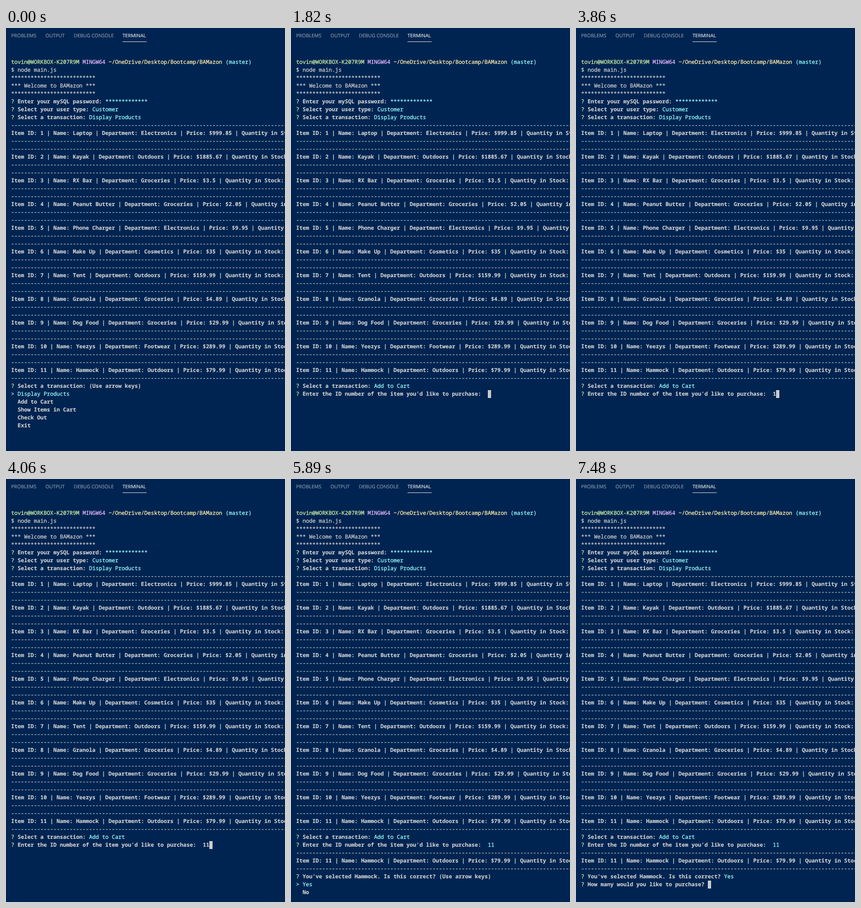
An HTML page for the animation above (8000 ms loop, 601 by 910 pixels).

```html
<!DOCTYPE html>
<html lang="en">
<head>
<meta charset="utf-8">
<title>Store terminal</title>
<style>
  html, body { margin: 0; width: 100%; height: 100%; overflow: hidden; background: #002451; }
  svg { display: block; width: 601px; height: 910px; }
  text { white-space: pre; text-rendering: geometricPrecision; stroke: currentColor; fill: currentColor; stroke-linejoin: round; }
  .term text { font: 500 11.6667px "Noto Sans Mono", "DejaVu Sans Mono", monospace; font-variant-ligatures: none; stroke-width: .3px; }
  .term .bold { font-weight: 600; stroke-width: .1px; }
  .tab { font: 10.5px "Open Sans", "Noto Sans", sans-serif; stroke-width: .2px; }
</style>
</head>
<body>
<svg id="stage" viewBox="0 0 601 910">
  <rect width="601" height="910" fill="#002451"/>
</svg>
<script>
const NS = "http://www.w3.org/2000/svg";
const LEFT = 11, TOP = 65, CELL = 7, ROW = 17, LOOP = 8000;
const COLORS = {
  white: "#cccccc", bold: "#d4d4d4", green: "#d1f1a9",
  magenta: "#ebbbff", yellow: "#ffeead", cyan: "#99ffff"
};
const stage = document.getElementById("stage");

function add(parent, tag, attrs, text) {
  const el = document.createElementNS(NS, tag);
  for (const key in attrs) el.setAttribute(key, attrs[key]);
  if (text) el.textContent = text;
  return parent.appendChild(el);
}

// A run is [style, text]; runs follow each other on the character grid.
function line(parent, row, ...runs) {
  let col = 0;
  for (const [style, text] of runs) {
    const x = LEFT + col * CELL, y = TOP + row * ROW;
    if (style === "cursor") {
      add(parent, "rect", { x, y, width: CELL, height: ROW, fill: COLORS.white });
    } else {
      add(parent, "text", { x, y: y + 12, color: COLORS[style], class: style }, text);
    }
    col += text.length;
  }
}

const CURSOR = ["cursor", " "];
const ask = (parent, row, message, ...rest) =>
  line(parent, row, ["green", "? "], ["bold", message + " "], ...rest);

function item(parent, row, id) {
  const [name, department, price] = products[id - 1];
  const rule = ["white", "-".repeat(86)];
  line(parent, row, rule);
  line(parent, row + 1, ["bold", `Item ID: ${id} | Name: ${name} | Department: ${department} | Price: $${price} | Quantity in Stock:`]);
  line(parent, row + 2, rule);
}

function menu(parent, row, options, selected) {
  options.forEach((option, i) => {
    const on = i === selected;
    line(parent, row + i, [on ? "cyan" : "bold", (on ? "> " : "  ") + option]);
  });
}

const products = [
  ["Laptop", "Electronics", "999.85"],
  ["Kayak", "Outdoors", "1885.67"],
  ["RX Bar", "Groceries", "3.5"],
  ["Peanut Butter", "Groceries", "2.05"],
  ["Phone Charger", "Electronics", "9.95"],
  ["Make Up", "Cosmetics", "35"],
  ["Tent", "Outdoors", "159.99"],
  ["Granola", "Groceries", "4.89"],
  ["Dog Food", "Groceries", "29.99"],
  ["Yeezys", "Footwear", "289.99"],
  ["Hammock", "Outdoors", "79.99"]
];
const actions = ["Display Products", "Add to Cart", "Show Items in Cart", "Check Out", "Exit"];

// Panel tabs
[["PROBLEMS", 11], ["OUTPUT", 85], ["DEBUG CONSOLE", 146], ["TERMINAL", 251]].forEach(([label, x], i) =>
  add(stage, "text", { x, y: 20, class: "tab", color: i === 3 ? "#e7e7e7" : "#8b99ab" }, label));
add(stage, "rect", { x: 251, y: 29, width: 52, height: 1, fill: "#e7e7e7" });

// Fixed terminal output
const term = add(stage, "g", { class: "term" });
line(term, 0, ["green", "tovin@WORKBOX-K207R9M "], ["magenta", "MINGW64 "],
  ["yellow", "~/OneDrive/Desktop/Bootcamp/BAMazon "], ["cyan", "(master)"]);
line(term, 1, ["white", "$ node main.js"]);
line(term, 2, ["white", "*".repeat(26)]);
line(term, 3, ["white", "*** Welcome to BAMazon ***"]);
line(term, 4, ["white", "*".repeat(26)]);
ask(term, 5, "Enter your mySQL password:", ["cyan", "*".repeat(13)]);
ask(term, 6, "Select your user type:", ["cyan", "Customer"]);
ask(term, 7, "Select a transaction:", ["cyan", "Display Products"]);
products.forEach((_, i) => item(term, 8 + 3 * i, i + 1));

// Interactive part
function choose(g, selected, hint) {
  ask(g, 41, "Select a transaction:", ["bold", hint]);
  menu(g, 42, actions, selected);
}

function enterId(g, ...input) {
  ask(g, 41, "Select a transaction:", ["cyan", "Add to Cart"]);
  ask(g, 42, "Enter the ID number of the item you'd like to purchase:", ["bold", " "], ...input);
}

function confirmItem(g, ...answer) {
  enterId(g, ["cyan", "11"]);
  item(g, 43, 11);
  ask(g, 46, "You've selected Hammock. Is this correct?", ...answer);
}

const scenes = [
  [0, g => choose(g, 0, "(Use arrow keys)")],
  [800, g => choose(g, 1, "")],
  [1820, g => enterId(g, CURSOR)],
  [3860, g => enterId(g, ["bold", "1"], CURSOR)],
  [4060, g => enterId(g, ["bold", "11"], CURSOR)],
  [4670, g => {
    confirmItem(g, ["bold", "(Use arrow keys)"]);
    menu(g, 47, ["Yes", "No"], 0);
  }],
  [6700, g => {
    confirmItem(g, ["cyan", "Yes"]);
    ask(g, 47, "How many would you like to purchase?", CURSOR);
  }]
].map(([start, draw]) => {
  const group = add(term, "g", {});
  draw(group);
  return { start, group };
});

function render(time) {
  const t = time % LOOP;
  const current = scenes.filter(s => s.start <= t).pop();
  for (const s of scenes) s.group.style.display = s === current ? "" : "none";
}

function tick() {
  render(performance.now());
  requestAnimationFrame(tick);
}
tick();
</script>
</body>
</html>
```
